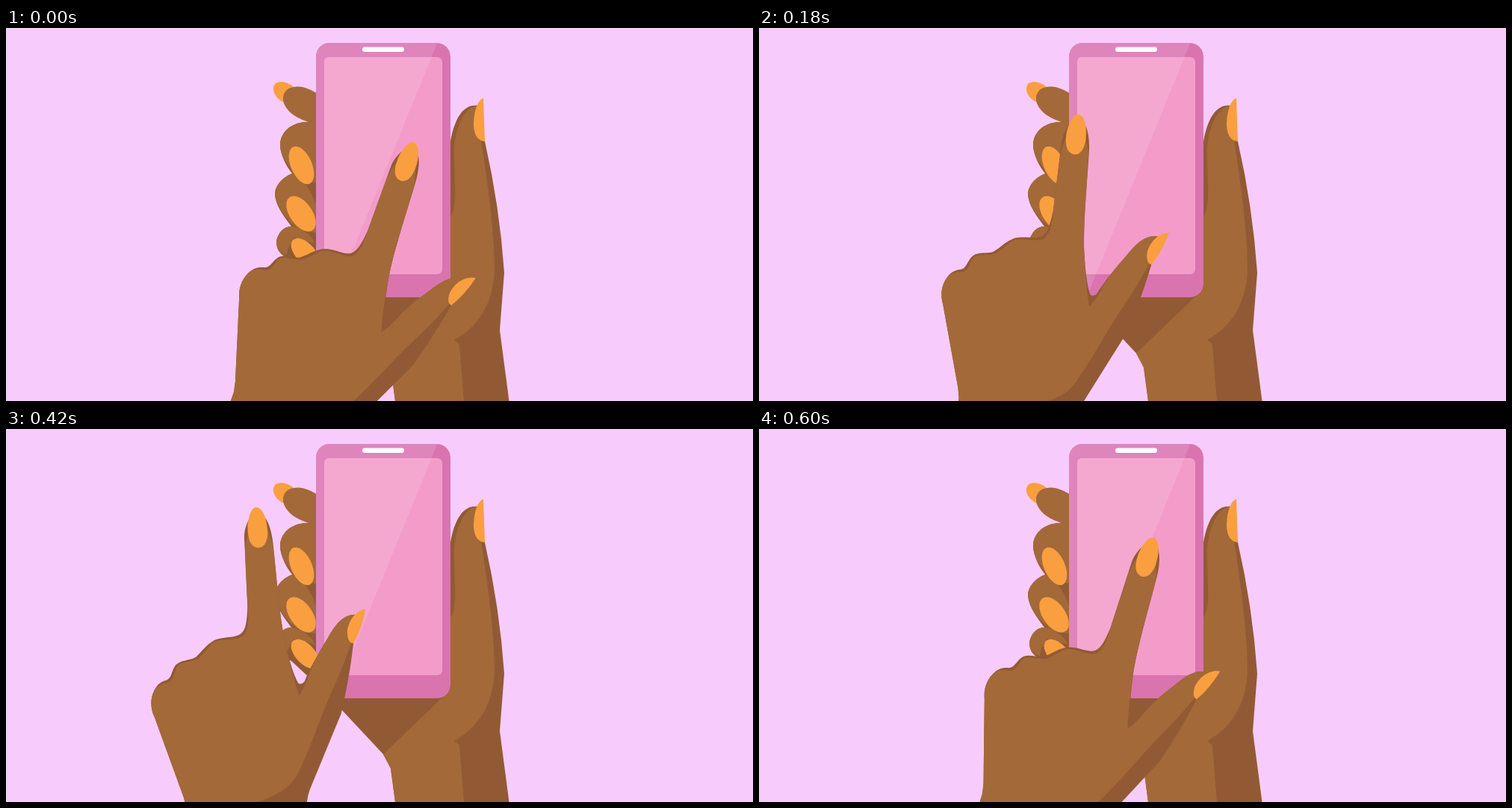
An HTML page with a canvas that plays this animation: 1000x500 px, repeating every 0.63 s.

```html
<!DOCTYPE html>
<html lang="en">
<head>
<meta charset="utf-8">
<title>Hand swiping on a phone</title>
<style>
html, body { margin: 0; width: 100%; height: 100%; overflow: hidden; background: #f7ccfd; }
canvas { display: block; width: 100vw; height: 100vh; }
</style>
</head>
<body>
<canvas id="stage" width="1000" height="500"></canvas>
<script>
const ctx = document.getElementById('stage').getContext('2d');
const SKIN = '#a36939', SHADE = '#925a34', NAIL = '#f99f40';
const LOOP = 630, STEP = 30, OUT = 356, BACK = 298;
const SWING = 25.4 * Math.PI / 180, PIVOT = [320, 657];

const shape = (color, d) => ({ color, path: new Path2D(d) });
const paint = list => list.forEach(s => {
  ctx.fillStyle = s.color;
  ctx.fill(s.path);
});

const holder = [
  // palm and wrist
  shape(SHADE, 'M415 340 L435 361 L505 436 L515 455 L521 500 L673.5 500 L661 405 L667 328 Q661 240 641 152 L632 104 C614 101 601 118 595 152 L590 340 Z'),
  shape(SKIN, 'M590 354 L583 361 L505 436 L515 455 L521 500 L613 500 L607 424 L600 418 C638 398 654 360 654 320 C653 265 645 210 636 150 L632 104 C612 104 598 140 600 175 C600 205 605 238 595 253 L590 256 Z'),
  shape(NAIL, 'M639 94 C630 97 626 116 626 130 Q627 151 641 152 Z'),
  // fingers behind the phone
  shape(SKIN, 'M371 98 C369 86 376 79 385 79 C396 77 406 81 420 90 L420 130 L402 125 C384 119 374 109 371 98 Z'),
  shape(NAIL, 'M385 79 C376 71 362 70 359 77 C355 84 362 95 371 99 C369 88 376 80 385 79 Z'),
  shape(SHADE, 'M420 124 L402 126 C380 127 367 141 367 157 C367 170 376 187 384 196 L414 236 L420 236 Z'),
  shape(SKIN, 'M420 124 L402 126 C380 127 367 141 367 157 C367 166 371 175 378 184 Q387 201 400 205 L420 208 Z'),
  shape(SHADE, 'M384 195 C371 199 360 211 360 223 C361 239 372 252 382 266 L415 291 L420 240 L414 236 C410 220 400 205 384 195 Z'),
  shape(SKIN, 'M384 195 C371 199 360 211 360 223 C361 235 368 245 375 254 Q386 268 404 273 L420 275 L420 240 L414 236 C410 220 400 205 384 195 Z'),
  shape(SHADE, 'M382 266 C370 266 362 278 362 289 C363 302 372 306 382 311 L410 337 L420 337 L420 292 L414 289 C408 277 397 268 382 266 Z'),
  shape(SKIN, 'M382 266 C370 266 362 278 362 289 C363 297 368 302 376 304 C377 296 380 288 386 281 L414 289 C408 277 397 268 382 266 Z')
];

const hand = [
  shape(SHADE, 'M230 498 L186 393 C179 380 179 367 184 356 C188 347 194 344 200 342 C207 338 205 329 211 321 C218 313.5 229 314.5 237 309.5 C246 301 249 293 261 285.5 C275 279 288 282 296 275 C303 269 303 255 303 238 L294 145 C294 132 298 122 304 115 L318 115 C325 122 330 134 333 152 C339 190 345 240 354 278 C361 303 368 326 376 338 Q380 340 384 335 C390 318 400 298 411 278 C421 257 431 243 447 242 L447 281 C445 310 441 345 435 376 Q415 432 398 480 Q395 490 395 502 L392 640 L242 640 Q238 545 234 511 Z'),
  shape(SKIN, 'M230 498 L186 393 C179 380 179 367 184 356 C189 348 196 347 203 345 C211 339 209 329 213 322 C220 316 231 316.5 240 311.5 C250 303 252 295 261 288 C275 282 290 285 299 278 C307 269 305 250 303 238 L296 165 C297 145 299 132 302 125 L319 125 Q327 138 333 155 C339 190 345 240 354 278 C360 300 368 330 378 354 Q386 340 391 321 C397 304 403 292 411 278 C421 257 431 243 447 242 L444 280 C437 305 428 330 416 360 C405 392 397 420 384 452 C375 477 355 490 325 501 Q300 508 280 530 L242 640 Q238 545 234 511 Z'),
  shape(NAIL, 'M308 105 C301 106 298 120 298 133 C299 149 304 159 313 159 C322 159 326 149 325 136 C323 119 317 105 308 105 Z'),
  shape(NAIL, 'M461 234 C448 236 438 252 438 266 Q439 280 447 281 Q457 262 461 234 Z')
];

function box(x, y, w, h, r) {
  const p = new Path2D();
  p.roundRect(x, y, w, h, r);
  return p;
}
const body = box(415, 20, 180, 341, 18);
const screen = box(426, 39, 158, 291, 6);
const pill = box(477, 25.5, 56, 6.5, 3.2);
const glare = new Path2D('M400 0 L585.5 0 L438 362 L400 362 Z');

function panel(path, base, lit) {
  ctx.save();
  ctx.clip(path);
  paint([{ color: base, path }, { color: lit, path: glare }]);
  ctx.restore();
}

function nail(x, y, rx, ry, deg) {
  ctx.fillStyle = NAIL;
  ctx.beginPath();
  ctx.ellipse(x, y, rx, ry, deg * Math.PI / 180, 0, Math.PI * 2);
  ctx.fill();
}

// 1 = on the screen, 0 = furthest left
function reach(t) {
  const phase = t < OUT ? t / OUT : 1 + (t - OUT) / BACK;
  return (1 + Math.cos(Math.PI * phase)) / 2;
}

function draw(t) {
  ctx.fillStyle = '#f7ccfd';
  ctx.fillRect(0, 0, 1000, 500);
  paint(holder);
  panel(body, '#d974af', '#de85bc');
  panel(screen, '#f39cca', '#f4a8d0');
  paint([{ color: '#fff', path: pill }]);
  nail(395.5, 184, 14, 27, -24);
  nail(395, 249, 15, 27, -35);
  nail(400.5, 301.5, 13, 24, -43);

  ctx.save();
  ctx.translate(...PIVOT);
  ctx.rotate(SWING * reach(t));
  ctx.translate(-PIVOT[0], -PIVOT[1]);
  paint(hand);
  ctx.restore();
}

const start = performance.now();
function tick() {
  const t = (performance.now() - start) % LOOP;
  draw(Math.floor(t / STEP) * STEP);
  requestAnimationFrame(tick);
}
tick();
</script>
</body>
</html>
```
